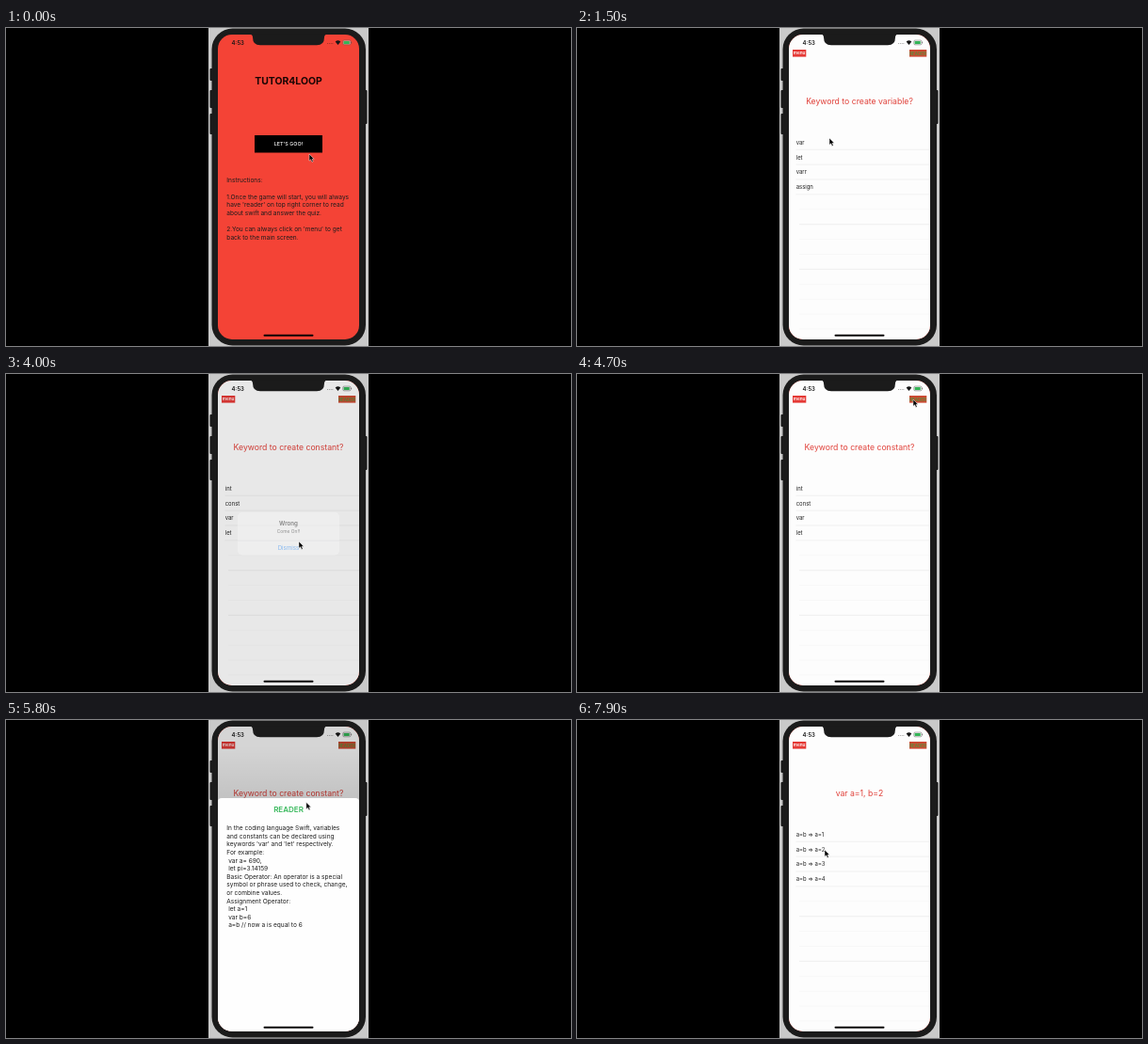
Animation, 600 px wide and 338 px high, one loop 8 s. Source, as an HTML page:

```html
<!DOCTYPE html>
<html lang="en">
<head>
<meta charset="utf-8">
<title>Quiz app demo</title>
<style>
  html, body { margin: 0; width: 100%; height: 100%; overflow: hidden; background: #000; }
  svg { display: block; width: 100vw; height: 100vh; }
  text { font-family: Inter, "Open Sans", sans-serif; white-space: pre; }
  .mid { text-anchor: middle; }
  .body { font-size: 6.57px; fill: #1c1c1c; }
</style>
</head>
<body>
<svg viewBox="0 0 600 338">
  <defs>
    <clipPath id="screen"><rect x="225" y="7" width="150" height="324" rx="15"/></clipPath>
    <linearGradient id="shade" x2="0" y2="1">
      <stop offset="0" stop-opacity="0"/>
      <stop offset="1" stop-opacity=".1"/>
    </linearGradient>
  </defs>
  <rect width="600" height="338"/>
  <rect x="215" width="170" height="338" fill="#c9c9c9"/>
  <g fill="#1b1b1b">
    <rect x="218.5" y="0.5" width="163.5" height="337" rx="22"/>
    <rect x="216.5" y="43" width="4" height="13" rx="1"/>
    <rect x="216.5" y="66" width="4" height="19" rx="1"/>
    <rect x="216.5" y="91" width="4" height="22" rx="1"/>
    <rect x="380" y="66" width="3.5" height="36" rx="1"/>
  </g>

  <g clip-path="url(#screen)">
    <rect x="225" y="7" width="150" height="324" fill="#f44336"/>
    <text class="mid" x="300" y="59.5" font-size="10.4" font-weight="700" fill="#190504">TUTOR4LOOP</text>
    <rect x="264" y="114" width="72" height="18.5"/>
    <text class="mid" x="300" y="125.3" font-size="5.4" font-weight="500" fill="#fff">LET'S GOO!</text>
    <g id="instructions"></g>

    <g id="quiz">
      <rect x="225" y="7" width="150" height="326" fill="#fdfdfd"/>
      <rect id="highlight" x="225" width="150" height="16" fill="#cecece"/>
      <g id="separators"></g>
      <rect x="229" y="23" width="14.3" height="7.6" fill="#e53935"/>
      <text class="mid" x="236.1" y="28.4" font-size="4.7" font-weight="600" fill="#fff">menu</text>
      <rect x="353" y="23" width="18.3" height="7.6" fill="#cb4a32"/>
      <text class="mid" x="362.1" y="28.5" font-size="4.5" font-weight="600" fill="#55903c">READER</text>
      <text class="mid" id="question" x="300" y="80.6" font-size="8.67" fill="#e0413a"></text>
      <g id="options"></g>
    </g>

    <g fill="#151515">
      <text x="239.5" y="17.6" font-size="6" font-weight="600">4:53</text>
      <g opacity=".45">
        <circle cx="341.5" cy="16.6" r=".5"/><circle cx="343.3" cy="16.6" r=".5"/>
        <circle cx="345.1" cy="16.6" r=".5"/><circle cx="346.9" cy="16.6" r=".5"/>
      </g>
      <path d="M349.7 14.6Q352.5 11.8 355.3 14.6L352.5 17.9Z"/>
      <rect x="357.8" y="13.1" width="8.2" height="4.7" rx="1.2" fill="#fff" fill-opacity=".4" stroke="#555" stroke-width=".5"/>
      <rect x="358.6" y="13.9" width="6.2" height="3.1" rx=".6" fill="#35b558"/>
      <rect x="366.4" y="14.7" width=".7" height="1.5" fill="#555"/>
    </g>

    <rect id="dim" x="225" y="7" width="150" height="324"/>
    <g id="alert">
      <rect x="246" y="147" width="108" height="45.5" rx="5" fill="#f7f7f7"/>
      <path d="M246 177.3H354" stroke="#d5d5d8" stroke-width=".4"/>
      <text class="mid" x="300" y="161.4" font-size="6.2" font-weight="600" fill="#111">Wrong</text>
      <text class="mid" x="300" y="168.9" font-size="4.9" fill="#222">Come On!!</text>
      <text class="mid" x="300" y="187.4" font-size="6.2" fill="#1680fa">Dismiss</text>
    </g>
    <g id="sheet">
      <rect x="225" y="7" width="150" height="60" fill="url(#shade)" id="shadow"/>
      <rect x="225" y="63" width="150" height="300" rx="4" fill="#fefefe"/>
      <text class="mid" x="300" y="78.4" font-size="8" font-weight="600" fill="#38b95c">READER</text>
      <g id="lesson"></g>
    </g>
    <rect x="273.5" y="325.8" width="53" height="2" rx="1" fill="#080404"/>
  </g>
  <path d="M259 6.5Q262 7 262 10Q262 18.3 270 18.3H330Q338 18.3 338 10Q338 7 341 6.5Z" fill="#1b1b1b"/>
  <path id="cursor" d="M0 0V7.2L1.7 5.7L2.9 8.4L4.2 7.8L3 5.2H5.2Z" fill="#000" stroke="#fff" stroke-width=".45"/>
</svg>
<script>
const LOOP = 8000, STEP = 100, SHEET_HIDDEN = 275;
const $ = id => document.getElementById(id);

const instructions = [
  [164.3, 'Instructions:'],
  [181.6, '1.Once the game will start, you will always'],
  [190.2, "have 'reader' on top right corner to read"],
  [198.8, 'about swift and answer the quiz.'],
  [216, "2.You can always click on 'menu' to get"],
  [224.6, 'back to the main screen.']
];
const lesson = [
  'In the coding language Swift, variables',
  'and constants can be declared using',
  "keywords 'var' and 'let' respectively.",
  'For example:',
  ' var a= 690,',
  ' let pi=3.14159',
  'Basic Operator: An operator is a special',
  'symbol or phrase used to check, change,',
  'or combine values.',
  'Assignment Operator:',
  ' let a=1',
  ' var b=6',
  ' a=b // now a is equal to 6'
];
const quizzes = [
  { from: 0, question: 'Keyword to create variable?', options: ['var', 'let', 'varr', 'assign'] },
  { from: 2200, question: 'Keyword to create constant?', options: ['int', 'const', 'var', 'let'] },
  { from: 7400, question: 'var a=1, b=2', options: [1, 2, 3, 4].map(n => `a=b => a=${n}`) }
];

// Keys are [time, value, value...]
const cursorKeys = [
  [0, 322, 134], [400, 311, 124], [800, 309, 123], [1400, 268, 117], [2200, 268, 117],
  [2700, 259, 134], [3100, 259, 134], [3700, 311, 181], [4000, 311, 178], [4600, 357, 27],
  [5200, 357, 27], [5700, 318, 76], [6200, 326, 186], [6300, 326, 191], [6600, 322, 190],
  [7100, 244, 167], [7400, 244, 167], [7900, 263, 138]
];
const alertKeys = [
  [2900, 0], [3000, .23], [3100, .65], [3200, .9], [3300, 1],
  [3800, 1], [3900, .8], [4000, .45], [4100, .15], [4200, 0]
];
const sheetKeys = [
  [4700, 275], [4800, 185], [4900, 80], [5000, 22], [5100, 0],
  [5700, 0], [6000, 60], [6200, 150], [6300, 246], [6400, 275]
];
const firstRowKeys = [[1800, 0], [1900, 1], [2100, 1], [2300, 0]];
const secondRowKeys = [[2800, 0], [2900, 1], [3000, 1], [3300, 0]];

const linear = k => k;
const smooth = k => k * k * (3 - 2 * k);

function track(keys, t, ease = linear) {
  const next = keys.findIndex(key => key[0] > t);
  if (next === 0) return keys[0].slice(1);
  if (next < 0) return keys[keys.length - 1].slice(1);
  const a = keys[next - 1], b = keys[next];
  const k = ease((t - a[0]) / (b[0] - a[0]));
  return a.slice(1).map((v, i) => v + (b[i + 1] - v) * k);
}

function add(parent, tag, attrs, content = '') {
  const node = document.createElementNS('http://www.w3.org/2000/svg', tag);
  for (const name in attrs) node.setAttribute(name, attrs[name]);
  node.textContent = content;
  return parent.appendChild(node);
}
const set = (id, name, value) => $(id).setAttribute(name, value);

instructions.forEach(([y, line]) => add($('instructions'), 'text', { class: 'body', x: 234.3, y }, line));
lesson.forEach((line, i) => add($('lesson'), 'text', { class: 'body', x: 234.3, y: 97.2 + i * 8.6 }, line));
for (let i = 0; i < 13; i++) {
  const strong = i < 4 || i === 5 || i === 8;
  add($('separators'), 'path', {
    d: `M${i < 4 ? 232.5 : 236} ${129.2 + i * 15.9}H375`,
    stroke: strong ? '#e6e6e6' : '#f4f4f4', 'stroke-width': .6
  });
}
const optionNodes = [0, 1, 2, 3].map(i =>
  add($('options'), 'text', { x: 232.7, y: 123.6 + i * 15.9, 'font-size': 5.95, fill: '#222' }));

function render(t) {
  const rise = Math.min(1, Math.max(0, (t - 600) / 500));
  set('quiz', 'transform', `translate(0 ${326 * (1 - rise) ** 3})`);

  const quiz = quizzes.filter(q => t >= q.from).pop();
  $('question').textContent = quiz.question;
  quiz.options.forEach((option, i) => optionNodes[i].textContent = option);

  const early = t < 2500;
  set('highlight', 'y', early ? 113.2 : 129.1);
  set('highlight', 'opacity', track(early ? firstRowKeys : secondRowKeys, t)[0]);

  const [alpha] = track(alertKeys, t);
  const scale = t < 3500 ? 1 + .24 * (1 - alpha) : 1;
  set('alert', 'opacity', alpha);
  set('alert', 'transform', `translate(300 169.6) scale(${scale}) translate(-300 -169.6)`);

  const [offset] = track(sheetKeys, t);
  const shown = 1 - offset / SHEET_HIDDEN;
  set('sheet', 'transform', `translate(0 ${offset})`);
  set('shadow', 'opacity', shown);
  set('dim', 'opacity', Math.max(.18 * alpha, .17 * shown));

  const [x, y] = track(cursorKeys, t, smooth);
  set('cursor', 'transform', `translate(${x} ${y})`);
}

const start = performance.now();
function tick() {
  const elapsed = (performance.now() - start) % LOOP;
  render(Math.floor(elapsed / STEP) * STEP);
  requestAnimationFrame(tick);
}
tick();
</script>
</body>
</html>
```
